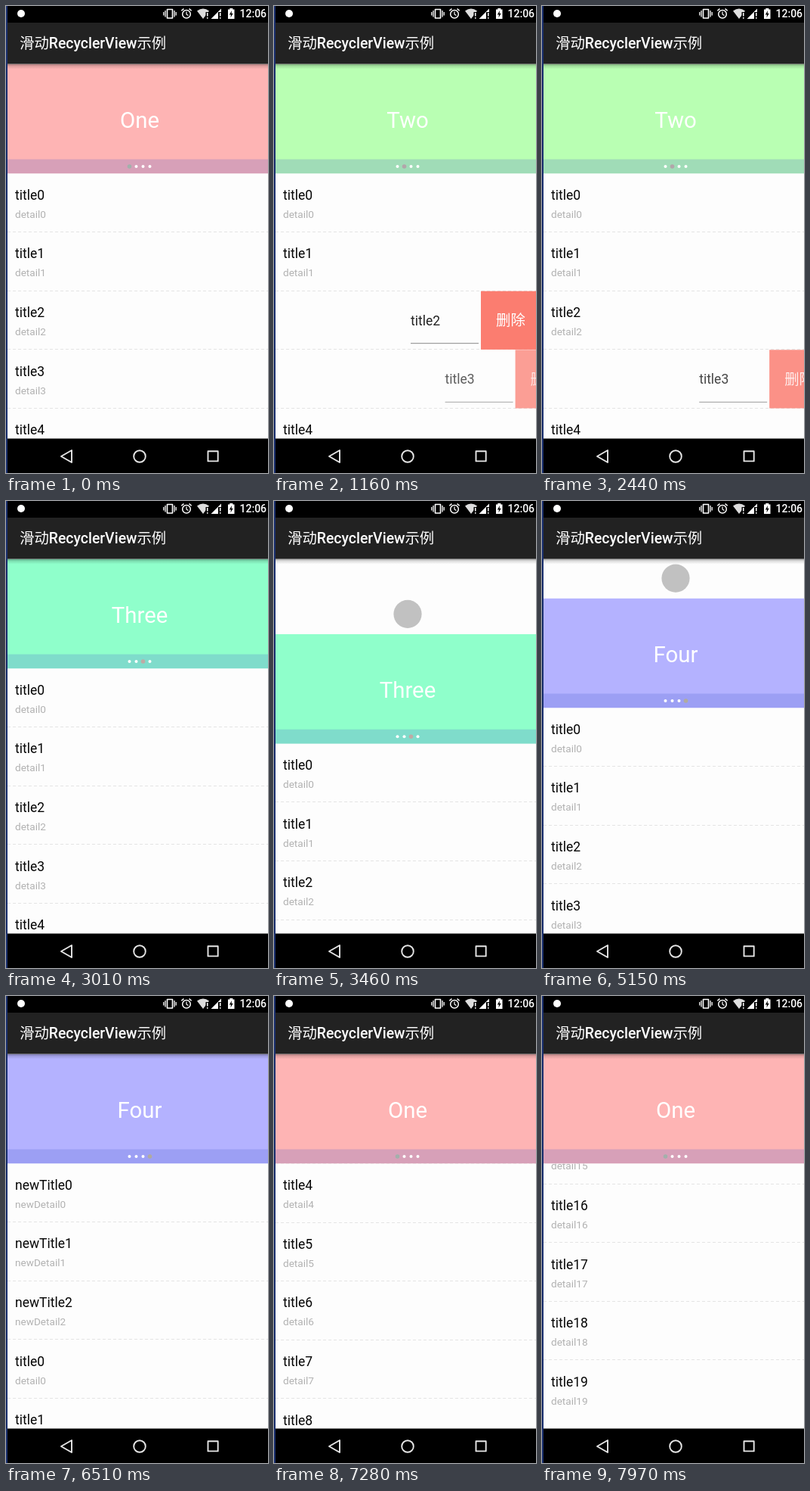
Animation, 347 px wide and 617 px high, one loop 8 s. Source, as an HTML page with a canvas:

```html
<!DOCTYPE html>
<html lang="zh">
<head>
<meta charset="utf-8">
<title>滑动列表</title>
<style>
html, body { margin: 0; width: 100%; height: 100%; overflow: hidden; background: #000; }
canvas { display: block; width: 347px; height: 617px; }
</style>
</head>
<body>
<canvas id="stage"></canvas>
<script>
const W = 347, H = 617, LOOP = 8000;
const LEFT = 2, TOP = 76.5, PAGER_H = 145, BOTTOM = 571.5, ROW_H = 77.6;
const SANS = 'Roboto, "Noto Sans CJK SC", "Noto Sans CJK", sans-serif';
const CJK = '"Noto Sans CJK SC", "Noto Sans CJK", sans-serif';
const PAGES = [
  { name: 'One', color: '#feb4b4', dot: '#a3b0ab' },
  { name: 'Two', color: '#b9ffb3', dot: '#b2a6aa' },
  { name: 'Three', color: '#8fffcb', dot: '#bfaaa5' },
  { name: 'Four', color: '#b4b2ff', dot: '#b0ab9f' }
];

const canvas = document.getElementById('stage');
const ctx = canvas.getContext('2d');
const dpr = window.devicePixelRatio || 1;
canvas.width = W * dpr;
canvas.height = H * dpr;

const span = (t, a, b) => Math.min(1, Math.max(0, (t - a) / (b - a)));
const smooth = u => u * u * (3 - 2 * u);
const easeOut = (u, power) => 1 - Math.pow(1 - u, power);

function rect(x, y, w, h, color) {
  ctx.fillStyle = color;
  ctx.fillRect(x, y, w, h);
}

function disc(x, y, r, color) {
  ctx.fillStyle = color;
  ctx.beginPath();
  ctx.arc(x, y, r, 0, Math.PI * 2);
  ctx.fill();
}

function text(str, x, y, size, color, { weight = 400, align = 'left', family = SANS } = {}) {
  ctx.font = `${weight} ${size}px ${family}`;
  ctx.textAlign = align;
  ctx.fillStyle = color;
  ctx.fillText(str, x, y);
  return ctx.measureText(str).width;
}

function path(points, close) {
  ctx.beginPath();
  points.forEach(([x, y], i) => i ? ctx.lineTo(x, y) : ctx.moveTo(x, y));
  if (close) ctx.closePath();
}

function fillPath(points, color) {
  path(points, true);
  ctx.fillStyle = color;
  ctx.fill();
}

function line(points, color, width, close) {
  path(points, close);
  ctx.strokeStyle = color;
  ctx.lineWidth = width;
  ctx.stroke();
}

function clipped(x, y, w, h, draw) {
  ctx.save();
  ctx.beginPath();
  ctx.rect(x, y, w, h);
  ctx.clip();
  draw();
  ctx.restore();
}

// Motion, all as functions of time
function pagePosition(t) {
  let pos = 0;
  for (let k = 0; k < 4; k++) {
    const start = 890 + 1950 * k;
    pos += easeOut(span(t, start, start + 200), 5);
  }
  return pos;
}

function pullOffset(t) {
  if (t < 3960) return 104 * smooth(span(t, 3130, 3510));
  if (t < 5960) return 104 - 52 * easeOut(span(t, 3960, 4470), 2);
  return 52 * (1 - easeOut(span(t, 5960, 6510), 2));
}

function fillLevel(t) {
  if (t < 5140) return span(t, 3940, 4980);
  return span(t, 5150, 6150);
}

function menuOpen(row, t) {
  if (row === 2) return smooth(span(t, 20, 570)) - easeOut(span(t, 1330, 1900), 3);
  if (row === 3) return smooth(span(t, 930, 1280)) - easeOut(span(t, 2410, 2960), 3);
  return 0;
}

const listScroll = t => 1447.8 * smooth(span(t, 6780, 7985));

function drawRefresh(y, t) {
  const cx = 177, r = 18.6, cy = y - 26.4;
  ctx.save();
  disc(cx, cy, r, '#c1c1c1');
  const level = fillLevel(t);
  if (level > 0) {
    ctx.beginPath();
    ctx.arc(cx, cy, r, 0, Math.PI * 2);
    ctx.clip();
    const surface = cy + r - level * 2 * r;
    const amp = 1.8 * Math.min(1, 6 * level * (1 - level));
    const pts = [[cx + r, cy + r], [cx - r, cy + r]];
    for (let x = -r; x <= r; x += 2) {
      pts.push([cx + x, surface - amp * Math.cos((x + r) / 8 + (t - 4280) / 150)]);
    }
    pts.push([cx + r, surface]);
    fillPath(pts, '#cb1d17');
  }
  ctx.restore();
}

function drawPager(y, t) {
  const pos = pagePosition(t), first = Math.floor(pos), width = W - LEFT;
  clipped(LEFT, y, width, PAGER_H, () => {
    for (let i = first; i <= first + 1; i++) {
      const page = PAGES[i % 4], x = LEFT + (i - pos) * width;
      rect(x, y, width + 1, PAGER_H, page.color);
      text(page.name, x + width / 2 + 2.5, y + 84, 29.4, '#fff', { align: 'center' });
    }
    rect(LEFT, y + 126, width, 19, 'rgba(63,81,200,.2)');
    const active = Math.ceil(pos) % 4;
    for (let i = 0; i < 4; i++) {
      const on = i === active;
      disc(163.5 + i * 9, y + 135.5, on ? 2.8 : 2, on ? PAGES[i].dot : '#fff');
    }
  });
}

function drawMenu(label, y, open) {
  const dx = 170 * (1 - open);
  ctx.save();
  ctx.globalAlpha = open;
  text(label, 181 + dx, y + 45, 17.5, '#222');
  rect(181 + dx, y + 68.5, 90, 1, '#888');
  rect(274 + dx, y, 73, ROW_H - 0.4, '#fb7d70');
  text('删除', 294 + dx, y + 45.5, 19.4, '#fff', { family: CJK });
  ctx.restore();
}

function drawList(y, t) {
  const scroll = listScroll(t), fresh = t >= 5930, count = fresh ? 23 : 20;
  clipped(LEFT, y, W - LEFT, Math.max(0, BOTTOM - y), () => {
    for (let i = 0; i < count; i++) {
      const top = y + i * ROW_H - scroll;
      if (top > BOTTOM || top + ROW_H < y) continue;
      const added = fresh && i < 3, n = fresh && !added ? i - 3 : i;
      const open = menuOpen(i, t), x = 12 - 170 * open;
      text((added ? 'newTitle' : 'title') + n, x, top + 34.3, 17.5, '#050505');
      text((added ? 'newDetail' : 'detail') + n, x, top + 58.3, 13.6, '#b2b2b2');
      if (i < count - 1) {
        ctx.setLineDash([4, 3]);
        const edge = Math.round(top + ROW_H) - 0.5;
        line([[LEFT, edge], [W, edge]], '#e4e4e4', 1);
        ctx.setLineDash([]);
      }
      if (open > 0.001) drawMenu('title' + n, top, open);
    }
  });
}

function drawStatusBar() {
  const white = '#fff';
  rect(LEFT, 0, W - LEFT, 22, '#000');
  disc(20, 10, 5, white);

  // vibrate
  ctx.strokeStyle = white;
  ctx.lineWidth = 1.6;
  ctx.strokeRect(213.5, 4.5, 7, 11.5);
  for (const s of [-1, 1]) {
    line([[217 + s * 6, 6], [217 + s * 6, 14.5]], white, 1.3);
    line([[217 + s * 8.2, 8], [217 + s * 8.2, 12.5]], white, 1.3);
  }

  // alarm
  ctx.beginPath();
  ctx.arc(239, 10.8, 5.3, 0, Math.PI * 2);
  ctx.lineWidth = 1.5;
  ctx.stroke();
  line([[239, 7.5], [239, 11], [241.5, 12.5]], white, 1.2);
  line([[232.3, 6.3], [235.5, 3.6]], white, 1.5);
  line([[245.7, 6.3], [242.5, 3.6]], white, 1.5);

  // wifi
  ctx.beginPath();
  ctx.moveTo(261, 17);
  ctx.lineTo(253, 6.5);
  ctx.quadraticCurveTo(261, 0.5, 269, 6.5);
  ctx.closePath();
  ctx.fillStyle = '#ddd';
  ctx.fill();
  rect(264.5, 8, 5, 9, '#000');
  rect(266, 9, 1.5, 4.5, white);
  rect(266, 15, 1.5, 1.7, white);

  // signal
  fillPath([[271.5, 17], [285, 17], [285, 3.5]], white);
  rect(281, 8, 5, 9.5, '#000');
  rect(283, 9, 1.5, 4.5, white);
  rect(283, 15, 1.5, 1.7, white);

  // battery
  rect(294, 4.5, 8.5, 12.5, white);
  rect(296.3, 3, 4, 2, white);
  fillPath([[299, 6], [295.8, 11.5], [298, 11.5], [297.4, 15.5], [300.8, 9.8], [298.6, 9.8]], '#000');

  text('12:06', 309.5, 15.4, 14, white, { weight: 500 });
}

function drawToolbar() {
  rect(LEFT, 22, W - LEFT, TOP - 22, '#222');
  let x = 18;
  x += text('滑动', x, 56.2, 19.4, '#fff', { family: CJK });
  x += text('RecyclerView', x, 56, 19.4, '#fff', { weight: 500 });
  text('示例', x, 56.2, 19.4, '#fff', { family: CJK });
  const shade = ctx.createLinearGradient(0, TOP, 0, TOP + 7);
  shade.addColorStop(0, 'rgba(0,0,0,.36)');
  shade.addColorStop(0.4, 'rgba(0,0,0,.13)');
  shade.addColorStop(1, 'rgba(0,0,0,0)');
  rect(LEFT, TOP, W - LEFT, 7, shade);
}

function drawNavBar() {
  const color = '#e6e6e6';
  rect(LEFT, BOTTOM, W - LEFT, H - BOTTOM, '#000');
  ctx.lineJoin = 'round';
  line([[73, 595], [87, 587], [87, 603]], color, 1.9, true);
  ctx.beginPath();
  ctx.arc(177, 595, 7.8, 0, Math.PI * 2);
  ctx.stroke();
  ctx.strokeRect(267.5, 588.2, 13.2, 13.2);
}

function render(t) {
  ctx.setTransform(dpr, 0, 0, dpr, 0, 0);
  rect(0, 0, W, H, '#fdfdfd');
  rect(0, 0, LEFT, H, '#1a2f6d');
  const y = TOP + pullOffset(t);
  if (y > TOP + 0.1) drawRefresh(y, t);
  drawList(y + PAGER_H, t);
  drawPager(y, t);
  drawStatusBar();
  drawToolbar();
  drawNavBar();
}

const begin = performance.now();
function tick() {
  render((performance.now() - begin) % LOOP);
  requestAnimationFrame(tick);
}
tick();
</script>
</body>
</html>
```
